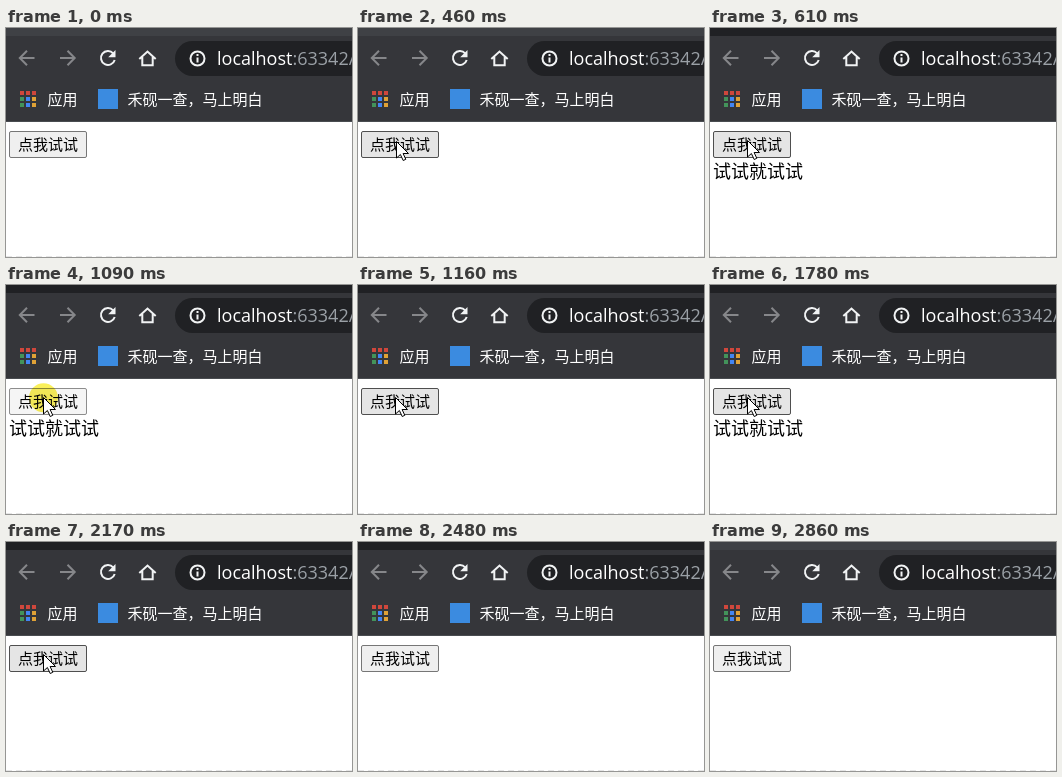
Animation, 346 px wide and 229 px high, one loop 2.94 s. Source, as an HTML page:

```html
<!DOCTYPE html>
<html lang="zh-CN">
<head>
<meta charset="utf-8">
<title>按钮演示</title>
<style>
html, body { margin: 0; width: 100%; height: 100%; overflow: hidden; background: #fff; }
svg { display: block; width: 346px; height: 229px; }
text { font: 15px "Noto Sans CJK SC", "Noto Sans CJK", sans-serif; white-space: pre; }
.url { font: 500 18px "Open Sans", "Noto Sans", sans-serif; }
.label { font-weight: 350; }
.icon { fill: none; stroke: #f1f3f4; stroke-width: 2; }
.dim { stroke: #86878a; }
#click { mix-blend-mode: multiply; }
</style>
</head>
<body>
<svg viewBox="0 0 346 229">
  <rect width="346" height="229" fill="#fff"/>
  <rect width="346" height="94" fill="#35363a"/>
  <rect id="strip" width="346" height="8"/>
  <rect y="93" width="346" height="1" fill="#494c50"/>
  <rect x="169" y="13" width="220" height="35" rx="17.5" fill="#202124"/>

  <path class="icon dim" d="M28.5 30H14.5M21 22.8L13.8 30L21 37.2"/>
  <path class="icon dim" d="M54 30H68M61.5 22.8L68.7 30L61.5 37.2"/>
  <path class="icon" d="M107.2 25.3A7 7 0 1 0 108.7 32"/>
  <path d="M109.5 22V29.3H102.2Z" fill="#f1f3f4"/>
  <path class="icon" d="M133.3 31L141.5 23.5L149.7 31M136.3 29V37.3H146.7V29"/>
  <circle class="icon" cx="191.5" cy="30.5" r="7"/>
  <path class="icon" d="M191.5 29.5V34.5M191.5 26V28"/>
  <text class="url" x="211" y="37" fill="#fff">localhost<tspan fill="#9aa0a6" font-weight="400">:63342/</tspan></text>

  <g id="apps"></g>
  <text x="41.5" y="77.3" fill="#fff">应用</text>
  <rect x="92" y="61" width="20" height="20" fill="#3b8be0"/>
  <text x="121.5" y="77.3" fill="#fff">禾砚一查，马上明白</text>

  <path d="M0 228.5H346" stroke="#e6e6e6" stroke-dasharray="6 4"/>
  <rect id="button" x="3.5" y="103.5" width="77" height="26" rx="1.5"/>
  <text class="label" x="12" y="122.4" fill="#000">点我试试</text>
  <text id="reply" x="3" y="149.8" fill="#000" style="font-size:18px">试试就试试</text>
  <circle id="click" cx="37.5" cy="112.8" r="14.5" fill="#faf05a"/>
  <path id="cursor" d="M0 0V16.5L3.9 13L6.7 19L9.3 17.8L6.6 12H12Z" fill="#fff" stroke="#000"/>
</svg>
<script>
const LOOP = 2940;
const $ = id => document.getElementById(id);

// [start, x, y]; no position means the pointer is off stage
const moves = [
  [0], [70, 155, 183], [150, 118, 162], [230, 86, 146], [310, 60, 133],
  [380, 45, 120], [460, 38.5, 113.5], [540, 37.5, 112.5],
  [2320, 46, 124], [2400, 230, 211], [2480]
];
const presses = [[540, 610], [1090, 1160], [1620, 1780], [2080, 2170]];
const replies = [[610, 1160], [1780, 2170]];
const darkStrip = [[540, 2860]];
const looks = {
  idle: ['#efefef', '#767676'],
  hover: ['#e5e5e5', '#4f4f4f'],
  down: ['#f5f5f5', '#8d8d8d']
};

const within = (spans, t) => spans.some(([from, to]) => t >= from && t < to);
const show = (el, on) => el.setAttribute('visibility', on ? 'visible' : 'hidden');

const [red, green, blue, gold] = ['#cf473c', '#43935a', '#4285f4', '#e0a236'];
[red, red, red, green, blue, gold, green, blue, gold].forEach((fill, i) => {
  const dot = document.createElementNS('http://www.w3.org/2000/svg', 'rect');
  const attrs = { x: 14 + i % 3 * 6, y: 63 + Math.floor(i / 3) * 6, width: 4, height: 4, fill };
  for (const key in attrs) dot.setAttribute(key, attrs[key]);
  $('apps').append(dot);
});

function draw(t) {
  const [, x, y] = moves.filter(m => m[0] <= t).pop();
  const onStage = x !== undefined;
  const pressed = within(presses, t);
  const over = onStage && x >= 3 && x < 81 && y >= 103 && y < 130;
  const [fill, stroke] = looks[pressed ? 'down' : over ? 'hover' : 'idle'];

  $('strip').setAttribute('fill', within(darkStrip, t) ? '#202124' : '#3f4145');
  $('button').setAttribute('fill', fill);
  $('button').setAttribute('stroke', stroke);
  show($('reply'), within(replies, t));
  show($('click'), pressed);
  show($('cursor'), onStage);
  if (onStage) $('cursor').setAttribute('transform', `translate(${x} ${y})`);
}

const start = performance.now();
function tick() {
  draw((performance.now() - start) % LOOP);
  requestAnimationFrame(tick);
}
tick();
</script>
</body>
</html>
```
